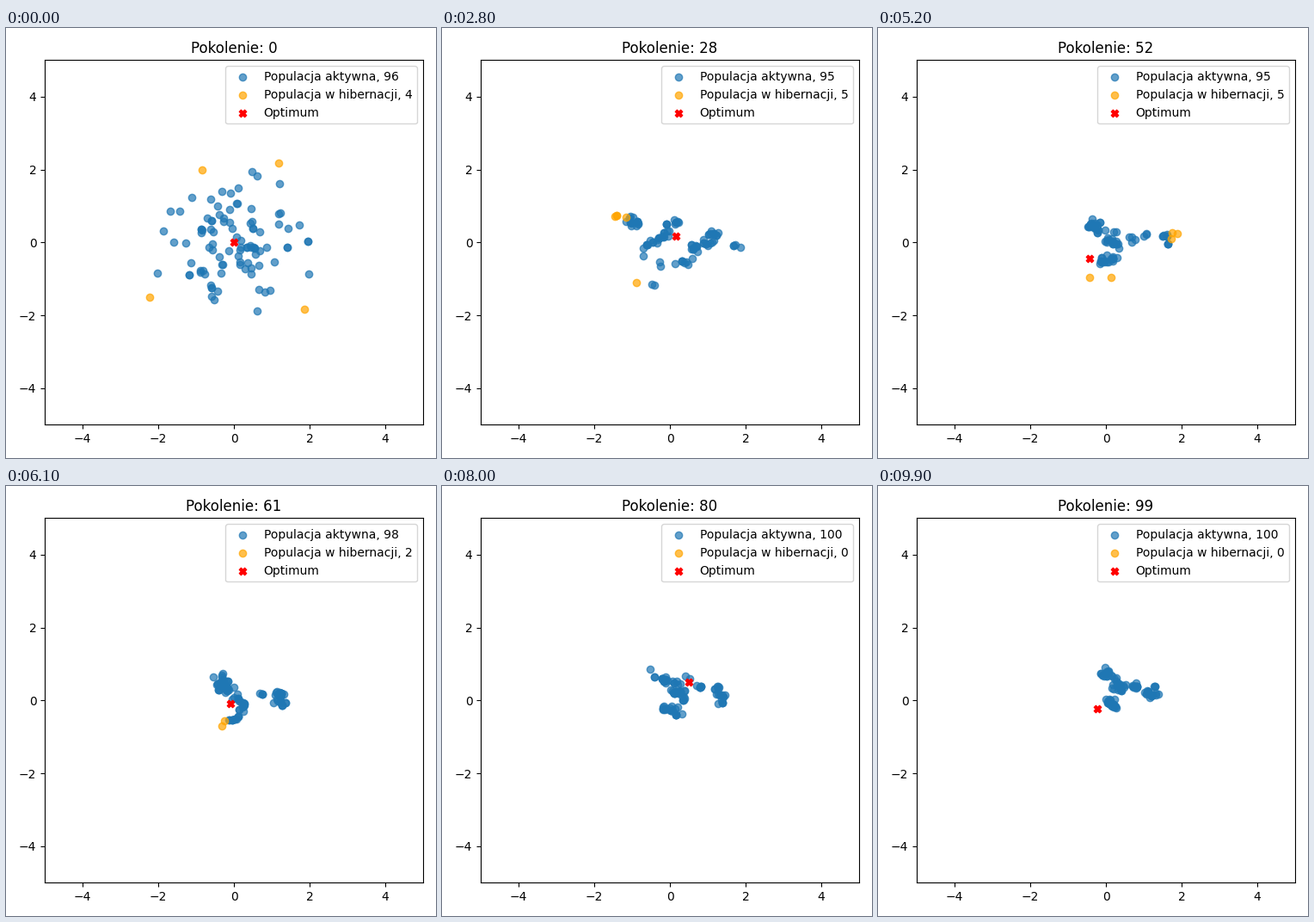
A matplotlib script for the animation above (10000 ms loop, 500 by 500 pixels).

```python
import numpy as np
import matplotlib.pyplot as plt
from matplotlib.animation import FuncAnimation

GENERATIONS = 100
SIZE = 100
rng = np.random.default_rng(11)


def sleeper_count(g):
    return int(round(np.interp(g, [0, 15, 28, 52, 66], [4, 13, 5, 5, 0])))


def breed(pop):
    """Replace some individuals by clones of others, a few of them mutated."""
    reborn = rng.random(SIZE) < .3
    pop = np.where(reborn[:, None], pop[rng.integers(SIZE, size=SIZE)], pop)
    mutant = reborn & (rng.random(SIZE) < .5)
    pop = pop + mutant[:, None] * rng.normal(0, .13, (SIZE, 2))
    return (pop - pop.mean(axis=0)) / pop.std(axis=0)


def place(pop, g):
    """Scale the population to the narrowing, slowly drifting cloud."""
    t = g / (GENERATIONS - 1)
    centre = np.array([.45 * t, .3 * t**2])
    spread = np.array([.9 - .45 * t, .28 + .6 * np.exp(-4 * t)])
    return centre + spread * pop


def evolve():
    """Return the active and the hibernating points of every generation."""
    pop = rng.normal(size=(SIZE, 2)).clip(-2.2, 2.2)
    asleep, history = [], []
    for g in range(GENERATIONS):
        pop = breed(pop)
        points = place(pop, g)
        outermost = np.argsort(-np.hypot(*pop.T))
        n = sleeper_count(g)
        # The oldest sleepers wake first, the outermost points fall asleep.
        if g % 5 == 0:
            asleep = asleep[1:]
        asleep = asleep[max(len(asleep) - n, 0):]
        while len(asleep) < n:
            asleep.append(points[outermost[len(asleep)]])
        history.append((points[outermost[n:]], np.reshape(asleep, (-1, 2))))
    return history


history = evolve()

fig, ax = plt.subplots(figsize=(5, 5), dpi=100)
ax.set(xlim=(-5, 5), ylim=(-5, 5))
title = ax.set_title("Pokolenie: 0")
active = ax.scatter([], [], color="tab:blue", alpha=.7, label="Populacja aktywna")
asleep = ax.scatter([], [], color="orange", alpha=.7, label="Populacja w hibernacji")
optimum = ax.scatter([], [], color="red", marker="X", label="Optimum")
legend = ax.legend(loc="upper right")
fig.tight_layout()


def update(g):
    awake, sleeping = history[g]
    active.set_offsets(awake)
    asleep.set_offsets(sleeping)
    optimum.set_offsets([[.5 * np.sin(.1 * g)] * 2])
    title.set_text(f"Pokolenie: {g}")
    labels = legend.get_texts()
    labels[0].set_text(f"Populacja aktywna, {len(awake)}")
    labels[1].set_text(f"Populacja w hibernacji, {len(sleeping)}")
    return active, asleep, optimum, title, legend


anim = FuncAnimation(fig, update, frames=GENERATIONS, interval=100,
                     repeat=True, repeat_delay=0, blit=False)
plt.show()
```
